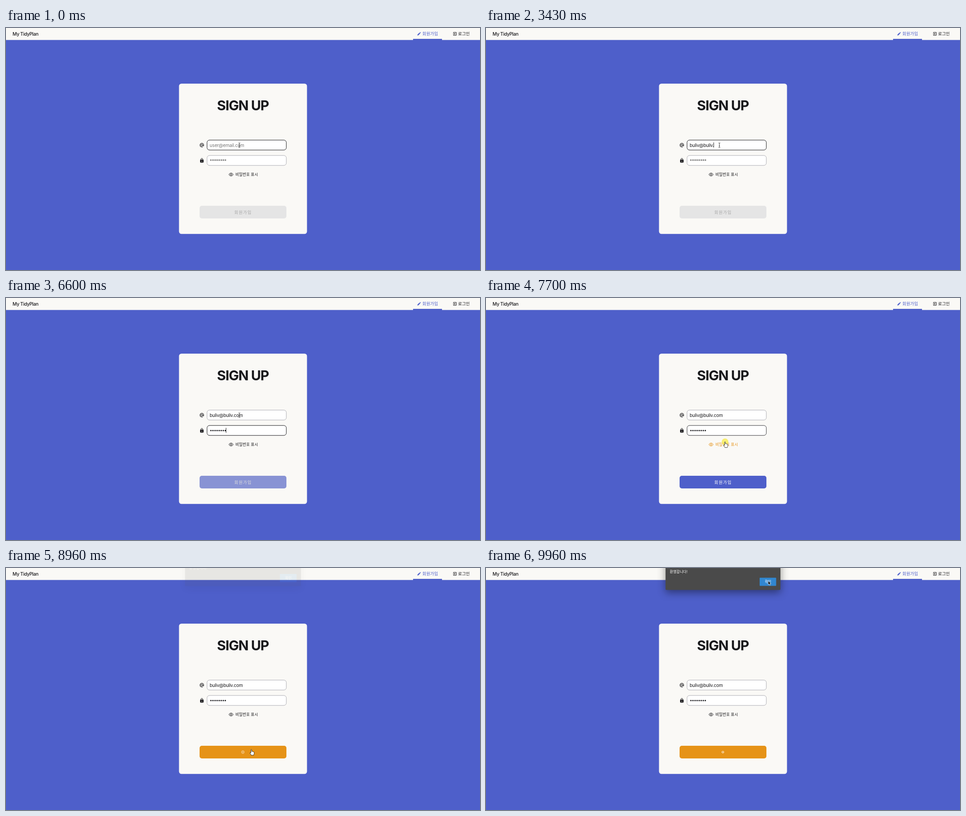
Animation, 1048 px wide and 535 px high, one loop 10000 ms. Source, as an HTML page:

```html
<!DOCTYPE html>
<html lang="ko">
<head>
<meta charset="utf-8">
<title>Sign up</title>
<style>
  html, body { margin: 0; width: 100%; height: 100%; overflow: hidden; background: #4e5fca; }
  svg { display: block; width: 100%; height: 100%; }
  text { font-family: Inter, "Noto Sans CJK KR", "Noto Sans CJK", sans-serif; fill: #18181b; white-space: pre; }
  .ko { font-family: "Noto Sans CJK KR", "Noto Sans CJK", sans-serif; }
  .field { font-size: 10px; letter-spacing: -.3px; }
  .line { fill: none; stroke: currentColor; }
  .box { fill: #fff; }
</style>
</head>
<body>
<svg viewBox="0 0 1048 535" preserveAspectRatio="none">
  <rect width="1048" height="535" fill="#4e5fca"/>
  <rect width="1048" height="26.5" fill="#faf9f6"/>
  <text x="14.6" y="16.5" font-size="10.3" font-weight="500" letter-spacing="-.38">My TidyPlan</text>
  <rect x="900" y="24" width="64" height="3" fill="#4e5fca"/>
  <g transform="translate(913.2 12.9)" fill="#4e5fca">
    <path d="M-3.6 3.6L-3.4 1.6 .9-2.7 2.7-.9-1.6 3.4ZM1.5-3.2L2.2-3.8Q2.6-4 3-3.6L3.6-3Q4-2.6 3.8-2.2L3.2-1.5Z"/>
  </g>
  <text class="ko" x="920.6" y="16.2" font-size="9.4" style="fill:#4e5fca">회원가입</text>
  <g transform="translate(992.3 12.9)" class="line" color="#18181b">
    <path d="M-3-1.6V-3.3H3.2V3.3H-3V1.6M-3.8 0H.8M-.8-1.7L.9 0-.8 1.7"/>
  </g>
  <text class="ko" x="999.6" y="16.2" font-size="9.4">로그인</text>

  <rect x="382.5" y="123" width="283" height="332.3" rx="5.5" fill="#faf9f6"/>
  <text x="466.6" y="182.2" font-size="30" font-weight="700" letter-spacing="-1.1">SIGN UP</text>

  <g transform="translate(433 259)" class="line" color="#18181b" stroke-width="1.05">
    <path d="M2.2 4.2H0A4.2 4.2 0 1 1 4.2 0V.7A1.05 1.05 0 0 1 2.1.7V0"/>
    <circle r="2.1"/>
  </g>
  <g transform="translate(433 293)" fill="#18181b">
    <rect x="-3.8" y="-2" width="7.6" height="6.6" rx="1"/>
    <path class="line" color="#18181b" d="M-2-1.8V-2.9A2 2 0 0 1 2-2.9V-1.8"/>
    <circle cy="1.3" r=".9" fill="#faf9f6"/>
  </g>
  <rect id="mailBox" class="box" x="444.5" y="247.8" width="175.3" height="22" rx="5.5"/>
  <rect id="passBox" class="box" x="444.5" y="281.8" width="175.3" height="22" rx="5.5"/>
  <text id="mailHint" class="field" x="450.3" y="262.6" style="fill:#757575;letter-spacing:-.18px">user@email.com</text>
  <text id="mail" class="field" x="450.3" y="262.6"></text>
  <text id="passHint" class="field" x="450.6" y="298.3" style="fill:#555;letter-spacing:-.45px">********</text>
  <g id="dots" fill="#18181b"></g>
  <rect id="caret" width="1" height="11" fill="#222"/>

  <g id="toggle">
    <g transform="translate(497.6 323.9)" class="line">
      <path d="M-4.6 0C-2.8-4.4 2.8-4.4 4.6 0 2.8 4.4-2.8 4.4-4.6 0Z"/>
      <circle r="1.6"/>
    </g>
    <text class="ko" x="507.2" y="326.9" font-size="8.6" style="fill:currentColor">비밀번호 표시</text>
  </g>

  <rect id="button" x="428" y="393" width="192" height="28" rx="5"/>
  <text id="label" class="ko" x="504.8" y="410.6" font-size="9.4" letter-spacing="1">회원가입</text>
  <g id="spinner" transform="translate(523.7 407)" fill="#fff">
    <circle id="ring" fill="none" stroke="#fff" stroke-width="1.2"/>
    <circle id="core" r="1"/>
  </g>

  <g id="dialog">
    <rect x="397" y="-40" width="254" height="88.5" rx="2" fill="#4a4a4a" style="filter:drop-shadow(0 6px 9px rgba(0,0,0,.42))"/>
    <text class="ko" x="406.3" y="11" font-size="8" style="fill:#fff">환영합니다!</text>
    <rect x="605" y="21.5" width="36.5" height="18" rx="1" fill="#3187d0"/>
    <text class="ko" x="616.4" y="33.2" font-size="7.6" style="fill:#fff">확인</text>
  </g>

  <circle id="mark" r="7.5" fill="#f7ec4f" fill-opacity=".78"/>
  <g id="beam" class="line" color="#333" stroke-width=".9">
    <path d="M-2-5Q0-5 0-4Q0-5 2-5M0-4V4M-2 5Q0 5 0 4Q0 5 2 5M-1 1H1"/>
  </g>
  <path id="arrow" fill="#000" stroke="#fff" stroke-width=".7" stroke-linejoin="round"
    d="M0 0V8.6L2-.0V6.7L0 8.6 2 6.8 3.3 9.8 4.7 9.2 3.4 6.3H6.1Z"/>
  <path id="hand" fill="#fff" stroke="#111" stroke-width=".8" stroke-linejoin="round"
    d="M-1 .8C-1-.4.9-.4.9.8V4.4C1.2 3.7 2.7 3.8 2.8 4.8 3.2 4.2 4.5 4.4 4.5 5.3 5 4.8 6.1 5.2 6.1 6.1V8.6C6.1 10 5.2 10.7 5.1 12.6H-.4C-.5 11-2.2 9.8-3.2 7.6-3.6 6.5-2.3 6.2-1.6 7.1L-1 7.8Z"/>
</svg>
<script>
const LOOP = 10000;
const EMAIL = 'buliv@buliv.com';
const MAIL_KEYS = [290, 410, 760, 920, 1250, 1830, 2240, 2410, 2590, 2720, 2980, 3430, 3640, 3710, 3910];
const PASS_KEYS = [5400, 5470, 5640, 5840, 6090, 6190, 6290, 6520];
const FOCUS = 200, NEXT = 4740, BLUR = 7670, SUBMIT = 8690, ALERT = 8935;
// Pointer legs: start, end, from, to
const LEGS = [
  [7300, 7640, [516, 259], [528.5, 318]],
  [8100, 8500, [528.5, 318], [542.5, 401.3]],
  [9110, 9940, [542.5, 401.3], [624, 28.5]]
];

const INK = [24, 24, 27], BLUE = [78, 95, 202], ORANGE = [230, 147, 23];
const EDGE = [172, 172, 178], GRAY = [229, 229, 229], DIM = [168, 168, 168], WHITE = [255, 255, 255];

const el = {};
document.querySelectorAll('[id]').forEach(n => el[n.id] = n);
PASS_KEYS.forEach((_, i) => {
  const dot = document.createElementNS('http://www.w3.org/2000/svg', 'circle');
  for (const [k, v] of Object.entries({ cx: 453.1 + 4.53 * i, cy: 293, r: 1.6 })) dot.setAttribute(k, v);
  el.dots.append(dot);
});
el.arrow.setAttribute('d', 'M0 0V8.6L2 6.8 3.3 9.8 4.7 9.2 3.4 6.3H6.1Z');

const clamp = v => Math.max(0, Math.min(1, v));
const smooth = v => v * v * (3 - 2 * v);
const show = (node, on) => node.style.display = on ? '' : 'none';
const set = (node, attrs) => { for (const k in attrs) node.setAttribute(k, attrs[k]); };

// cubic-bezier(.25, .1, .25, 1)
function ease(x) {
  if (x <= 0 || x >= 1) return clamp(x);
  const bez = (a, b, s) => 3 * a * s * (1 - s) ** 2 + 3 * b * s * s * (1 - s) + s ** 3;
  let lo = 0, hi = 1;
  for (let i = 0; i < 20; i++) {
    const mid = (lo + hi) / 2;
    if (bez(.25, .25, mid) < x) lo = mid; else hi = mid;
  }
  return bez(.1, 1, lo);
}

// Colour after a chain of 200 ms transitions
function fade(t, base, ...changes) {
  let c = base;
  for (const [start, to] of changes) {
    const k = ease((t - start) / 200);
    c = c.map((v, i) => v + (to[i] - v) * k);
  }
  return `rgb(${c.map(Math.round)})`;
}

function pointer(t) {
  let pos = LEGS[0][2];
  for (const [start, end, a, b] of LEGS) {
    if (t < start) break;
    const k = smooth(clamp((t - start) / (end - start)));
    pos = a.map((v, i) => v + (b[i] - v) * k);
  }
  return pos;
}

function drawFields(t) {
  const typed = MAIL_KEYS.filter(k => k <= t).length;
  const dots = PASS_KEYS.filter(k => k <= t).length;
  el.mail.textContent = EMAIL.slice(0, typed);
  show(el.mailHint, !typed);
  show(el.passHint, !dots);
  [...el.dots.children].forEach((d, i) => show(d, i < dots));
  set(el.mailBox, { stroke: fade(t, INK, [NEXT, EDGE]) });
  set(el.passBox, { stroke: fade(t, EDGE, [NEXT, INK], [BLUR, EDGE]) });

  const inPass = t >= NEXT;
  const last = Math.max(...[FOCUS, NEXT, ...MAIL_KEYS, ...PASS_KEYS].filter(k => k <= t));
  show(el.caret, t >= FOCUS && t < BLUR && (t - last) % 1020 < 510);
  const x = inPass ? 450.6 + 4.53 * dots : 450.3 + (typed ? el.mail.getComputedTextLength() : 0);
  set(el.caret, { x: Math.floor(x), y: inPass ? 287 : 253 });
}

function drawButtons(t) {
  el.toggle.style.color = fade(t, INK, [7480, ORANGE], [8200, INK]);
  set(el.button, { fill: fade(t, GRAY, [6530, BLUE], [8410, ORANGE]) });
  el.label.style.fill = fade(t, DIM, [6530, WHITE]);
  show(el.label, t < SUBMIT);
  show(el.spinner, t >= SUBMIT);
  const k = clamp((t - SUBMIT) / 270), back = clamp((t - 8960) / 150);
  set(el.ring, { r: 2.9 * k - .9 * back, opacity: .55 + .35 * back });
  set(el.core, { opacity: .65 * (1 - back) });
}

function drawDialog(t) {
  const p = clamp((t - ALERT) / 140);
  show(el.dialog, p > 0);
  set(el.dialog, {
    opacity: p ** 1.35,
    transform: `translate(${-5.24 * (1 - p)} ${-10 * (1 - p)}) scale(${1 + .01 * (1 - p)} 1)`
  });
}

function drawPointer(t) {
  const [x, y] = pointer(t);
  const inField = y < 270 || (y > 281 && y < 304);
  const onLink = (y > 316 && y < 331) || y > 393;
  const kind = t >= 9110 ? 'arrow' : inField ? 'beam' : onLink ? 'hand' : 'arrow';
  for (const k of ['beam', 'arrow', 'hand']) show(el[k], k === kind);
  const move = { transform: `translate(${x} ${y})` };
  set(el[kind], move);
  set(el.mark, move);
  show(el.mark, (t >= 7660 && t < 7790) || (t >= 8590 && t < 8700));
}

function draw(t) {
  drawFields(t);
  drawButtons(t);
  drawDialog(t);
  drawPointer(t);
}

const begin = performance.now();
function tick() {
  draw((performance.now() - begin) % LOOP);
  requestAnimationFrame(tick);
}
tick();
</script>
</body>
</html>
```
